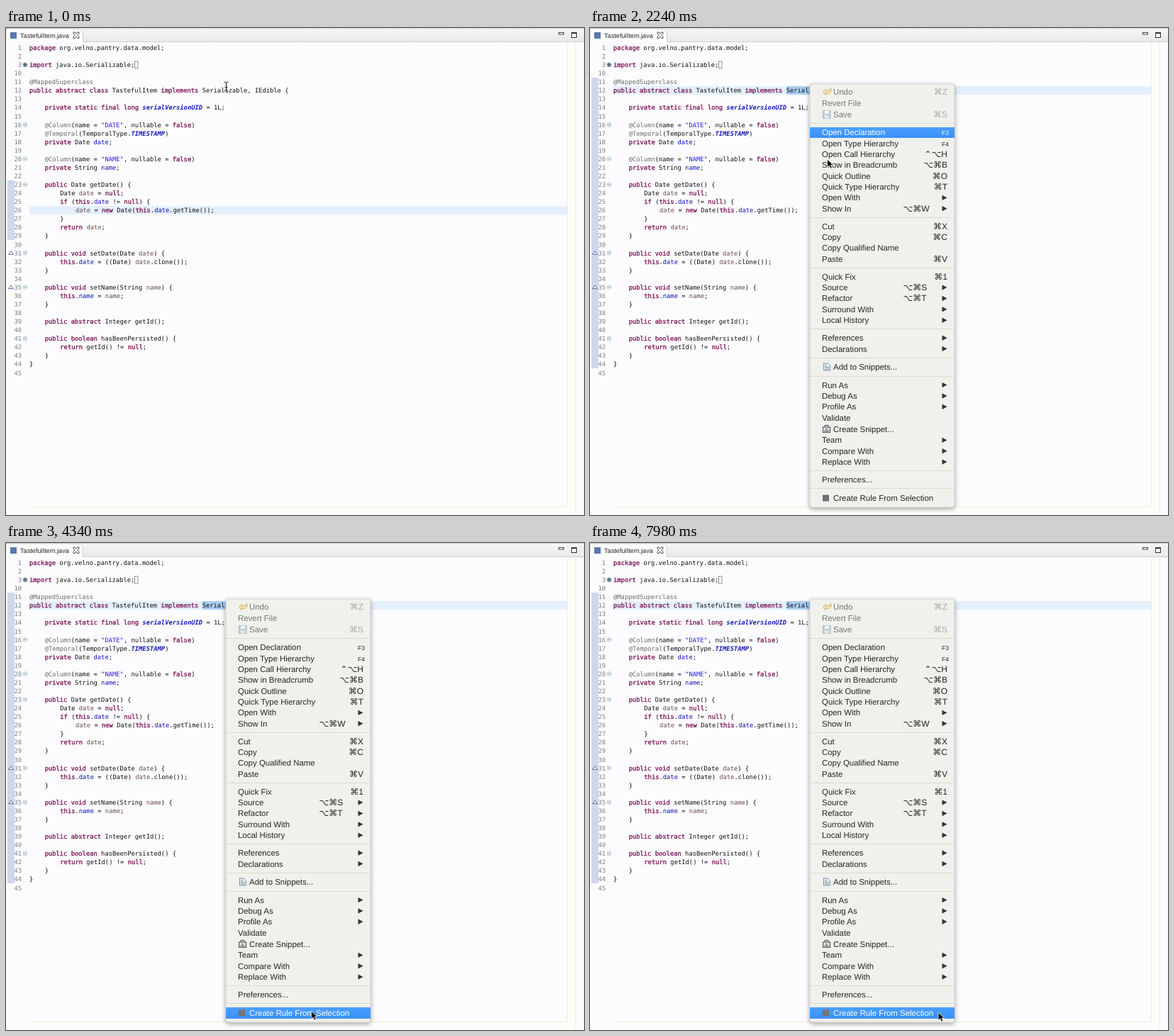
These frames come from a looping animation (815x687 px, 8 s). An HTML page:

```html
<!DOCTYPE html>
<html lang="en">
<head>
<meta charset="utf-8">
<title>Code editor with context menu</title>
<style>
html, body { margin: 0; width: 100%; height: 100%; overflow: hidden; background: #fcfcfe; }
svg { display: block; width: 815px; height: 687px; text-rendering: geometricPrecision; }
.code { font: 8.81px "DejaVu Sans Mono", monospace; fill: #111; }
.num { fill: #808080; text-anchor: end; }
.keyword { fill: #7f1b59; stroke: #7f1b59; stroke-width: .35px; }
.string { fill: #2a20f0; }
.field { fill: #1010b8; }
.constant { fill: #1818b8; font-weight: bold; font-style: italic; }
.local { fill: #6a4a45; }
.note { fill: #696969; }
.ui { font: 11.45px "Liberation Sans", "DejaVu Sans", sans-serif; fill: #262626; }
.keys { font-size: 12px; text-anchor: end; }
.beside { text-anchor: start; }
.small { font-size: 8.5px; }
.off { fill: #777; }
.off .keys { fill: #aaa; }
.hot text, .hot .arrow { fill: #fff; }
.bar { fill: none; }
.hot .bar { fill: url(#blue); }
</style>
</head>
<body>
<svg id="stage" viewBox="0 0 815 687">
  <defs>
    <linearGradient id="blue" x2="0" y2="1"><stop stop-color="#4ba0ff"/><stop offset="1" stop-color="#398ffb"/></linearGradient>
    <linearGradient id="strip" x2="0" y2="1"><stop stop-color="#f6f6f6"/><stop offset="1" stop-color="#e9e9e9"/></linearGradient>
    <filter id="shadow" x="-10%" y="-5%" width="120%" height="110%">
      <feDropShadow dx="0" dy="2" stdDeviation="3" flood-opacity=".4"/>
    </filter>
  </defs>
</svg>
<script>
const LOOP = 8000, ROW = 12.066, TOP = 21.8, CHAR = 5.305, TAB = 21.65, LEFT = 33;
const ITEM = 15.35, ICON_ITEM = 16.4, GAP = 9.65;
const SELECT_AT = 950, MENU_AT = 1400, RANGE_AT = 1950, HOVER_LAG = 60;
const stage = document.getElementById('stage');

function add(parent, tag, attrs = {}, text) {
  const node = document.createElementNS('http://www.w3.org/2000/svg', tag);
  for (const key in attrs) node.setAttribute(key, attrs[key]);
  if (text !== undefined) node.textContent = text;
  parent.append(node);
  return node;
}
const rect = (parent, x, y, width, height, fill, more) =>
  add(parent, 'rect', { x, y, width, height, fill, ...more });
const path = (parent, d, stroke, fill = 'none', more) =>
  add(parent, 'path', { d, stroke, fill, ...more });
const label = (parent, x, y, text, cls) => add(parent, 'text', { x, y, class: cls }, text);
const show = (node, on) => node.setAttribute('visibility', on ? 'visible' : 'hidden');

const source = `package org.velno.pantry.data.model;

import java.io.Serializable;

@MappedSuperclass
public abstract class TastefulItem implements Serializable, IEdible {

    private static final long serialVersionUID = 1L;

    @Column(name = "DATE", nullable = false)
    @Temporal(TemporalType.TIMESTAMP)
    private Date date;

    @Column(name = "NAME", nullable = false)
    private String name;

    public Date getDate() {
        Date date = null;
        if (this.date != null) {
            date = new Date(this.date.getTime());
        }
        return date;
    }

    public void setDate(Date date) {
        this.date = ((Date) date.clone());
    }

    public void setName(String name) {
        this.name = name;
    }

    public abstract Integer getId();

    public boolean hasBeenPersisted() {
        return getId() != null;
    }
}
`.split('\n');

const tokens = new RegExp([
  '(?<note>@\\w+)',
  '(?<string>"\\w+")',
  '(?<keyword>\\b(?:package|import|public|private|abstract|class|implements|static|final|long|void|boolean|return|if|new|this|null|false)\\b)',
  '(?<constant>serialVersionUID|TIMESTAMP)',
  '(?<field>(?<=this\\.)\\w+|(?<=private \\w+ )\\w+(?=;))',
  '(?<local>\\b(?:date|name)\\b(?! = "))'
].join('|'), 'g');

const rowTop = row => TOP + row * ROW;
const lineNumber = row => row < 3 ? row + 1 : row + 7;

// Background block covering whole rows, aligned to pixels
function rowBlock(x, row, count, width, fill) {
  const top = Math.round(rowTop(row));
  return rect(stage, x, top, width, Math.round(rowTop(row + count)) - top, fill);
}

function drawLine(line, row) {
  const y = rowTop(row) + 9.2;
  label(stage, 22, y, lineNumber(row), 'code num');
  const code = line.trimStart();
  const text = label(stage, LEFT + (line.length - code.length) / 4 * TAB, y, '', 'code');
  let end = 0;
  for (const match of code.matchAll(tokens)) {
    text.append(code.slice(end, match.index));
    const kind = Object.keys(match.groups).find(name => match.groups[name]);
    add(text, 'tspan', { class: kind }, match[0]);
    end = match.index + match[0].length;
  }
  text.append(code.slice(end));
}

// Editor frame
rect(stage, 0, 0, 815, 687, '#fcfcfe');
rect(stage, 791, 20, 12, 667, '#fcfcf8');
rect(stage, 32, 675, 759, 11, '#fcfcf8');
path(stage, 'M791.5 20V675M803.5 20V687M32 675.5H791', '#eeeee4');
rect(stage, 0, 0, 815, 19.5, 'url(#strip)');
path(stage, 'M0 .5H815M109 19.5H815', '#d0d0d0');
path(stage, 'M0 20V1H101Q108 1 108.5 8V20', '#c6c6c6', '#fdfdfd', { 'stroke-width': .8 });
rect(stage, 0, 19, 108, 3, '#fcfcfe');
rect(stage, 6, 6, 9, 9, '#5878ad');
label(stage, 20, 13.5, 'TastefulItem.java', 'ui').style.fontSize = '9.2px';
path(stage, 'M95 6h2.3l1.7 2 1.7-2h2.3v2l-2 2.2 2 2.2v2h-2.3l-1.7-2-1.7 2H95v-2l2-2.2-2-2.2z', '#333', '#fff', { 'stroke-width': .9 });
rect(stage, 779.5, 6.5, 7, 2.5, '#fff', { stroke: '#444' });
rect(stage, 797.5, 6.5, 7, 7, '#fff', { stroke: '#333' });
path(stage, 'M797 7.5h8', '#333');

const oldRange = rowBlock(2, 16, 7, 10, '#cfd8ea');
const newRange = rowBlock(2, 4, 34, 10, '#cfd8ea');
const oldLine = rowBlock(LEFT, 19, 1, 758, '#e4f0fc');
const newLine = rowBlock(LEFT, 5, 1, 758, '#e4f0fc');
const selection = rowBlock(LEFT + 46 * CHAR, 5, 1, 12 * CHAR, '#a9cdf4');

source.forEach(drawLine);
rect(stage, 181.5, 47, 4.5, 10, 'none', { stroke: '#777', 'stroke-width': .8 });

for (const row of [2, 9, 13, 16, 24, 28, 34]) {
  const closed = row === 2, y = rowTop(row) + 6;
  add(stage, 'circle', { cx: 27, cy: y, r: 2.9, fill: closed ? '#8fa6b8' : '#eef4f8', stroke: closed ? '#6d8798' : '#a9c3d2', 'stroke-width': .8 });
  path(stage, `M25 ${y}h4` + (closed ? `M27 ${y - 2}v4` : ''), closed ? '#345' : '#7899ad', 'none', { 'stroke-width': .9 });
}
for (const row of [24, 28]) path(stage, `M3.5 ${rowTop(row) + 8}l3.5-4.5 3.5 4.5z`, '#5a55a5', '#fff', { 'stroke-width': .9 });

// Context menu: label | shortcut | flags (">" submenu, "i" icon, "x" disabled); "-" is a separator
const menuSpec = `Undo|⌘Z|ix
Revert File||x
Save|⌘S|ix
-
Open Declaration|F3
Open Type Hierarchy|F4
Open Call Hierarchy|⌃⌥H
Show in Breadcrumb|⌥⌘B
Quick Outline|⌘O
Quick Type Hierarchy|⌘T
Open With||>
Show In|⌥⌘W|>
-
Cut|⌘X
Copy|⌘C
Copy Qualified Name
Paste|⌘V
-
Quick Fix|⌘1
Source|⌥⌘S|>
Refactor|⌥⌘T|>
Surround With||>
Local History||>
-
References||>
Declarations||>
-
Add to Snippets...||i
-
Run As||>
Debug As||>
Profile As||>
Validate
Create Snippet...||i
Team||>
Compare With||>
Replace With||>
-
Preferences...
-
Create Rule From Selection||i`;

const icons = {
  'Undo': (g, y) => path(g, `M328.5 ${y}l4-4v2.5h3q4-.5 4-3.5 1.5 7-4 7.5h-3v2z`, '#c9a75c', '#f4e2ae', { 'stroke-width': .8 }),
  'Save': (g, y) => {
    rect(g, 328.5, y - 5, 10.5, 10.5, '#c3d0da', { stroke: '#a6b3bd', 'stroke-width': .8 });
    rect(g, 331, y - 5, 6, 4, '#f4f6f7');
    rect(g, 331, y + 2, 5.5, 3.5, '#e8edf0');
  },
  'Add to Snippets...': (g, y) => {
    path(g, `M329.5 ${y - 5}h6l3 3v7h-9z`, '#748491', '#eef3f5', { 'stroke-width': .9 });
    path(g, `M331 ${y - 2}h3M331 ${y + .5}h6M331 ${y + 3}h6`, '#5b7f98');
  },
  'Create Snippet...': (g, y) => {
    rect(g, 328.5, y - 2.5, 10, 7.5, '#e6e8ea', { stroke: '#444' });
    path(g, `M331 ${y - 2.5}v-2.5h5v2.5M330 ${y + 3}h7M331.5 ${y + .5}h4`, '#444');
  },
  'Create Rule From Selection': (g, y) => rect(g, 328, y - 4, 9, 9, '#6f7375')
};

const menu = add(stage, 'g');
rect(menu, 310, 79, 204, 597, '#f0f0ed', { rx: 4, stroke: '#c4c4c0', 'stroke-width': .6, filter: 'url(#shadow)' });
const items = [];
let menuY = 82;
for (const entry of menuSpec.split('\n')) {
  if (entry === '-') {
    path(menu, `M310.5 ${Math.floor(menuY + GAP / 2) + .5}H513.5`, '#dcdccf');
    menuY += GAP;
    continue;
  }
  const [name, keys = '', flags = ''] = entry.split('|');
  const hasIcon = flags.includes('i'), submenu = flags.includes('>'), disabled = flags.includes('x');
  const height = hasIcon ? ICON_ITEM : ITEM, mid = menuY + height / 2 - .2;
  const top = Math.round(menuY), bottom = Math.round(menuY + height);
  const group = add(menu, 'g', { class: disabled ? 'off' : '' });
  add(group, 'rect', { x: 310, y: top, width: 204, height: bottom - top, class: 'bar' });
  label(group, hasIcon ? 343 : 327, mid + 4, name, disabled ? 'ui off' : 'ui');
  if (keys) {
    const small = /^F\d/.test(keys);
    const x = submenu ? 441.5 : small ? 506 : 504;
    label(group, x, mid + 4, keys, `ui keys ${submenu ? 'beside' : small ? 'small' : ''}`);
  }
  if (submenu) add(group, 'path', { d: `M496.5 ${mid - 3.7}v7.4l7-3.7z`, class: 'arrow', fill: '#333' });
  if (icons[name]) icons[name](group, mid);
  if (!disabled) items.push({ group, top, bottom });
  menuY += height;
}

// Pointers
const beam = path(stage, 'M307.5 76q3 0 3 2.5v8q0 2.5-3 2.5M313.5 76q-3 0-3 2.5M313.5 89q-3 0-3-2.5M308.5 83.5h4', '#222');
const arrow = path(stage, 'M0 0V11.5L2.7 9 4.6 13.2 6.8 12.2 4.9 8.2H8.5Z', '#fff', '#000', { 'stroke-width': .8 });

// Time, x, y of the arrow tip
const route = [
  [2050, 309.8, 81.8], [2660, 388.7, 411.8], [3250, 397.5, 594], [3500, 399.7, 602],
  [4300, 430, 660], [5460, 439.6, 660.3], [6840, 477.8, 660.3], [7980, 491, 662]
];
function tipAt(time) {
  if (time <= route[0][0]) return route[0].slice(1);
  const next = route.findIndex(point => point[0] >= time);
  if (next < 0) return route.at(-1).slice(1);
  const [t0, x0, y0] = route[next - 1], [t1, x1, y1] = route[next];
  const p = (time - t0) / (t1 - t0);
  return [x0 + (x1 - x0) * p, y0 + (y1 - y0) * p];
}

function render(time) {
  const selected = time >= SELECT_AT, open = time >= MENU_AT, ranged = time >= RANGE_AT;
  show(oldLine, !selected);
  show(newLine, selected);
  show(selection, selected);
  show(oldRange, !ranged);
  show(newRange, ranged);
  show(menu, open);
  show(beam, !open);
  show(arrow, open);
  arrow.setAttribute('transform', `translate(${tipAt(time)})`);
  const hoverY = tipAt(time - HOVER_LAG)[1];
  for (const { group, top, bottom } of items)
    group.classList.toggle('hot', open && hoverY >= top && hoverY < bottom);
}

const start = performance.now();
function tick() {
  render((performance.now() - start) % LOOP);
  requestAnimationFrame(tick);
}
tick();
</script>
</body>
</html>
```
